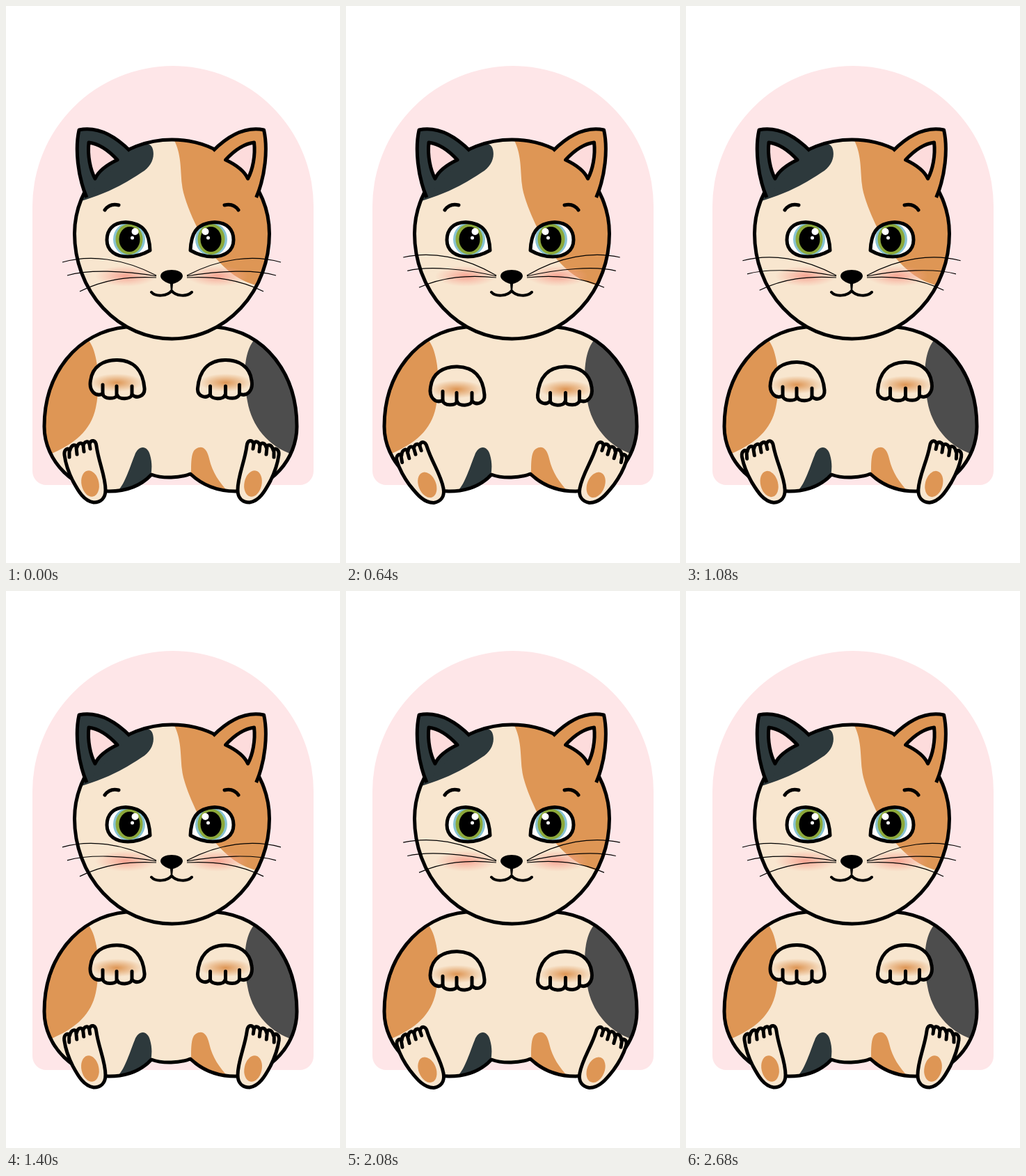
An HTML page for the animation above (4000 ms loop, 480 px wide and 800 px high).

```html
<!DOCTYPE html>
<html lang="en">
<head>
<meta charset="utf-8">
<title>Calico cat</title>
<style>
  html, body { margin: 0; width: 100%; height: 100%; overflow: hidden; background: #fff; }
  svg { display: block; width: 100vw; height: 100vh; }
  .line { stroke: #000; stroke-width: 5; stroke-linecap: round; stroke-linejoin: round; }
  .cream { fill: #f8e6cf; }
  .orange { fill: #de9655; }
  .dark { fill: #2d393c; }
  .grey { fill: #4d4d4d; }
  .none { fill: none; }
</style>
</head>
<body>
<svg viewBox="0 0 480 800">
  <defs>
    <radialGradient id="blush">
      <stop offset="0" stop-color="#f79d8c" stop-opacity=".9"/>
      <stop offset="1" stop-color="#f9a898" stop-opacity="0"/>
    </radialGradient>
    <radialGradient id="tan">
      <stop offset="0" stop-color="#de9655"/>
      <stop offset="1" stop-color="#de9655" stop-opacity="0"/>
    </radialGradient>

    <path id="body" d="M173 461C102 468 55 528 55 604C55 655 100 697 148 697C175 697 195 688 209 673C225 679 250 678 265 672C282 688 305 697 330 697C382 694 418 650 418 604C418 528 373 468 302 461C260 452 215 452 173 461Z"/>
    <path id="head" d="M98.500 327A140 135 0 0 1 378.500 327A140 151 0 0 1 98.500 327Z"/>
    <clipPath id="inBody"><use href="#body"/></clipPath>
    <clipPath id="inHead"><use href="#head"/></clipPath>

    <g id="foot">
      <g id="footTurn" class="line">
        <path class="cream" d="M84 645C83 636 90 634 92 638C94 629 101 629 102 634C104 626 110 627 111 631C113 625 118 624 120 629C122 622 129 623 130 632C133 655 143 675 143 695C143 707 136 713 126 713C112 711 104 697 96 682C90 670 86 660 84 645Z"/>
        <path class="none" d="M91 638V648M101 634L102 644M111 631L112 640M120 629L121 636"/>
        <ellipse class="orange" stroke="none" cx="121" cy="686" rx="12.500" ry="19" transform="rotate(-12 121 686)"/>
      </g>
    </g>

    <g id="paw">
      <g id="pawShift" class="line">
        <path class="cream" d="M139 557C128 562 119 552 121.500 538C124 518 140 508 160 508.500C185 509 197 525 199 549C200 560 188 565 181 558C180 565 162 566 160 559C157 565 140 565 139 557Z"/>
        <ellipse fill="url(#tan)" stroke="none" cx="159" cy="541" rx="38" ry="13"/>
        <path class="none" d="M139 544V557M159 546V559M181 546V558"/>
      </g>
    </g>

    <g id="ear" class="line">
      <path stroke-linecap="butt" d="M116 275C103 245 99 205 105 178C130 173 155 185 178 208"/>
      <path fill="#fddcdc" d="M119 196C117 215 121 235 128 248C133 237 145 228 160 221C148 208 135 198 119 196Z"/>
    </g>

    <g id="eye">
      <path id="almond" fill="#fff" d="M207 351C206 328 200 312 172 310.500C153 311 145 322 145 336C145 352 158 360 175 360C190 360 200 355 207 351Z"/>
      <ellipse cx="177" cy="335" rx="23" ry="24" fill="#87c3d3"/>
      <ellipse cx="177" cy="335" rx="19.500" ry="22" fill="#8ca83a"/>
      <ellipse cx="177.500" cy="335" rx="15" ry="18"/>
      <circle cx="185.500" cy="324" r="5" fill="#fff"/>
      <circle cx="181.500" cy="333" r="2.500" fill="#fff"/>
      <use href="#almond" class="line" style="fill-opacity:0"/>
    </g>

    <g id="cheek">
      <ellipse fill="url(#blush)" cx="172" cy="388" rx="44" ry="15"/>
      <path class="line none" d="M142 293C147 286 154 284 162 286"/>
      <path id="whiskers" fill="none" stroke="#000" stroke-width="1.200" d="M81 368C120 357 168 362 216 387M88 387C118 378 170 380 216 388M106 410C140 393 175 388 216 390"/>
    </g>
  </defs>

  <path fill="#fee6e8" d="M38 288A202 202 0 0 1 442 288V668A20 20 0 0 1 422 688H58A20 20 0 0 1 38 668Z"/>

  <use href="#body" class="cream"/>
  <g clip-path="url(#inBody)">
    <path class="orange" d="M117 478C133 495 136 545 129 577C122 610 98 630 60 645L40 650V470Z"/>
    <path class="grey" d="M358 478C340 497 341 540 347 568C353 603 377 633 412 644H430V470Z"/>
    <path class="dark" d="M158 699C170 690 178 662 185 645C190 631 203 630 207 645C210 655 210 665 208 675L190 699Z"/>
    <path class="orange" d="M266 674C266 655 266 640 273 636C282 630 289 636 292 650C297 672 308 685 320 699H290Z"/>
  </g>
  <use href="#body" class="line none"/>

  <use href="#foot"/>
  <use href="#foot" transform="translate(476) scale(-1 1)"/>
  <use href="#paw"/>
  <use href="#paw" transform="translate(474.500) scale(-1 1)"/>

  <use href="#head" class="cream"/>
  <g clip-path="url(#inHead)">
    <path class="orange" d="M240 190C255 215 249 245 255 268C265 305 290 350 305 366C325 388 345 400 375 404H400V190Z"/>
    <path class="dark" d="M175 205C190 196 206 195 210 203C215 215 210 230 195 239C165 259 140 271 105 281L100 200Z"/>
  </g>
  <use href="#head" class="line none"/>
  <use href="#ear" class="dark"/>
  <use href="#ear" class="orange" transform="translate(475.600) scale(-1 1)"/>
  <use href="#cheek"/>
  <use href="#cheek" transform="translate(476) scale(-1 1)"/>
  <use href="#eye"/>
  <use href="#eye" transform="translate(472) scale(-1 1)"/>

  <path d="M222 388C222 382 230 379 238 379C246 379 254 382 254 388C254 393 245 398 240 399L239 410H237L236 399C231 398 222 393 222 388Z"/>
  <path class="line none" style="stroke-width:4" d="M209 411C215 418 232 417 238 409C244 417 260 418 267 411"/>
</svg>
<script>
  const LOOP = 4000, CYCLE = 1335;
  const move = (id, value) => document.getElementById(id).setAttribute('transform', value);

  // Two smooth swings, then a rest until the loop ends.
  function draw(ms) {
    const t = ms % LOOP;
    const swing = t < 2 * CYCLE ? (1 - Math.cos(2 * Math.PI * t / CYCLE)) / 2 : 0;
    move('pawShift', `translate(0 ${9.5 * swing})`);
    move('footTurn', `rotate(${-10 * swing} 129 711)`);
    move('whiskers', `rotate(${3 * swing} 216 388)`);
  }

  const start = performance.now();
  function tick() {
    draw(performance.now() - start);
    requestAnimationFrame(tick);
  }
  tick();
</script>
</body>
</html>
```
